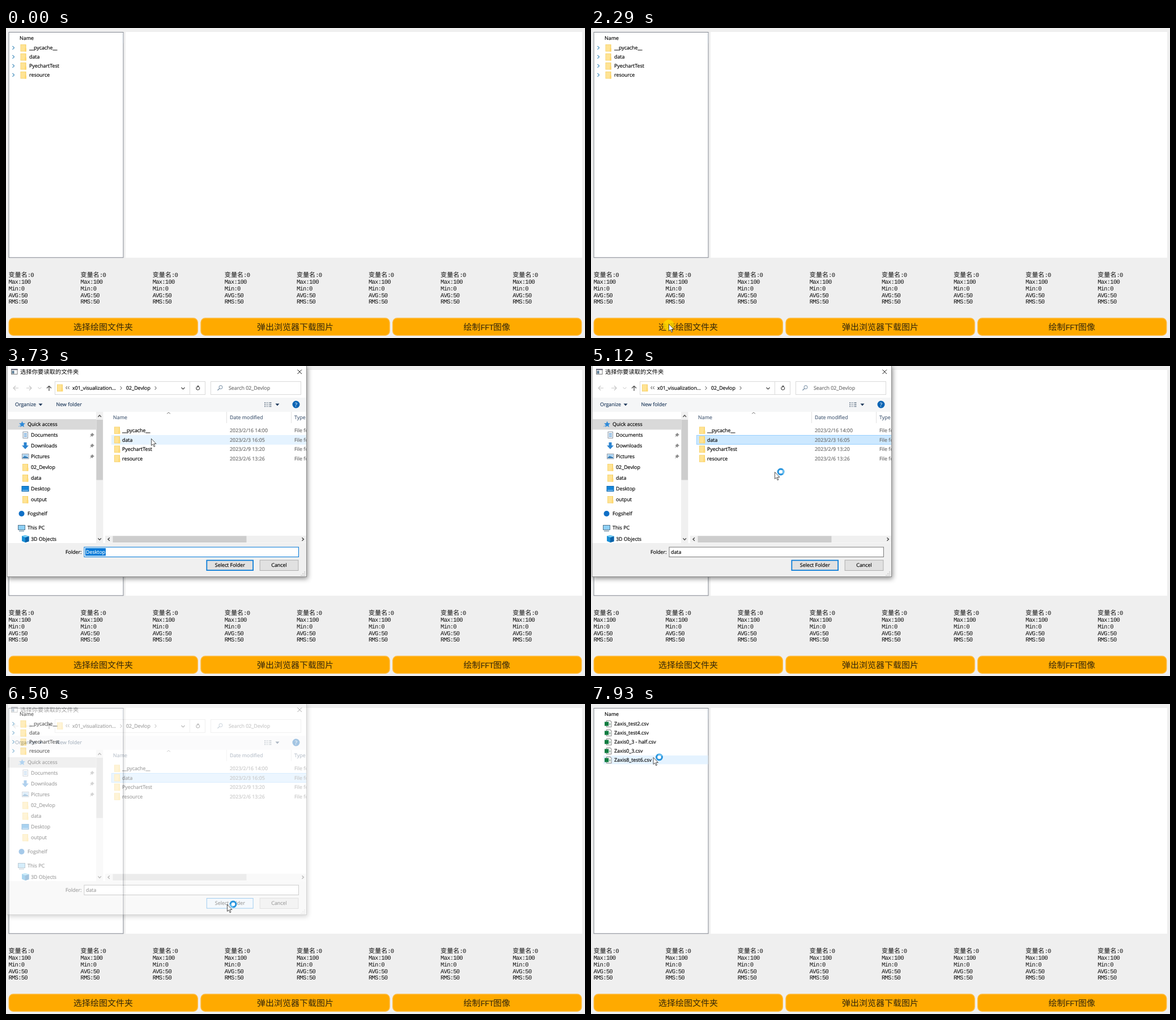
Write an HTML page that moves like this. It is 1022 px wide and 548 px high and loops after 8 s.

```html
<!DOCTYPE html>
<html lang="zh">
<head>
<meta charset="utf-8">
<title>Folder picker</title>
<style>
html, body { margin: 0; width: 100%; height: 100%; overflow: hidden; background: #efefef; }
svg { display: block; width: 1022px; height: 548px; }
text { white-space: pre; text-rendering: geometricPrecision; }
.ui { font: 8.9px "Open Sans", "Noto Sans", sans-serif; stroke-width: .18px; }
.cjk { font-family: "Noto Sans CJK SC", "Noto Sans CJK", "Noto Sans CJK JP", sans-serif; }
.thin { font-weight: 300; }
.mono { font-family: "Liberation Mono", monospace; }
</style>
</head>
<body>
<svg id="stage" viewBox="0 0 1022 548" xmlns="http://www.w3.org/2000/svg"></svg>
<script>
const LOOP = 8000;
const stage = document.getElementById('stage');
const $ = id => document.getElementById(id);

// Markup helpers
const rect = (x, y, w, h, fill, more = '') =>
  `<rect x="${x}" y="${y}" width="${w}" height="${h}" fill="${fill}" ${more}/>`;
const frame = (x, y, w, h, fill, stroke, sw = 1, more = '') =>
  rect(x + sw / 2, y + sw / 2, w - sw, h - sw, fill, `stroke="${stroke}" stroke-width="${sw}" ${more}`);
const line = (d, stroke, sw = 1, more = '') =>
  `<path d="${d}" fill="none" stroke="${stroke}" stroke-width="${sw}" ${more}/>`;
const shape = (d, fill) => `<path d="${d}" fill="${fill}"/>`;
const dot = (x, y, r, fill) => `<circle cx="${x}" cy="${y}" r="${r}" fill="${fill}"/>`;
const group = (id, body, more = '') => `<g id="${id}" ${more}>${body}</g>`;
// y is the middle of the line
const label = (x, y, s, fill = '#000', more = '') =>
  `<text class="ui" x="${x}" y="${y + 3.2}" fill="${fill}" stroke="${fill}" ${more}>${s}</text>`;
const chevron = (x, y, dx, dy, color, sw = 1) => dx
  ? line(`M${x - dx} ${y - 3}L${x + dx} ${y}L${x - dx} ${y + 3}`, color, sw)
  : line(`M${x - 3} ${y - dy}L${x} ${y + dy}L${x + 3} ${y - dy}`, color, sw);
// Latin letters take half the width of a Chinese character
const mixed = (x, y, s, size, color) => {
  const latin = size * 0.96, gap = size / 2 - latin * 0.6;
  const runs = s.match(/[\x20-\x7e]+|[^\x20-\x7e]+/g).map(r => r.charCodeAt(0) < 128
    ? `<tspan class="mono" font-size="${latin}" letter-spacing="${gap}">${r}</tspan>`
    : `<tspan class="cjk thin" font-size="${size}">${r}</tspan>`);
  return `<text x="${x}" y="${y}" fill="${color}">${runs.join('')}</text>`;
};

const folder = (x, y) =>
  rect(x, y - 6, 10, 12.5, '#f5cf63') + rect(x + .7, y - 5.3, 8, 11, '#ffe394') +
  rect(x + 7.6, y + 1, 2.9, 5.6, '#ffd86f');

const csvIcon = y =>
  shape(`M27 ${y - 6}H34L36.5 ${y - 3.5}V${y + 6}H27Z`, '#8a8a8a') +
  shape(`M28 ${y - 5}H33.6L35.5 ${y - 3}V${y + 5}H28Z`, '#fff') +
  rect(32, y - 1, 2.4, 3.5, '#9db8aa') + rect(24, y - 3.5, 7.2, 7.2, '#107c41');

const dirs = ['__pycache__', 'data', 'PyechartTest', 'resource'];
const files = ['Zaxis_test2.csv', 'Zaxis_test4.csv', 'Zaxis0_3 - half.csv', 'Zaxis0_3.csv', 'Zaxis8_test6.csv'];
const rowY = i => 35 + 16 * i;

function mainWindow() {
  let s = rect(0, 0, 1022, 548, '#efefef') + rect(211, 7, 806, 399, '#fff') +
    frame(4.5, 7, 203, 399.3, '#fff', '#828790') +
    line('M206 9V27', '#dfe7ef') + label(24, 18, 'Name') +
    rect(21.5, 91, 185, 15.5, '#e5f3ff', 'id="treeHover"');
  s += group('tree0', dirs.map((d, i) =>
    chevron(13, rowY(i), 1.6, 0, '#4c93bf', 1.1) + folder(25.5, rowY(i)) + label(41, rowY(i), d)).join(''));
  s += group('tree1', files.map((f, i) => csvIcon(rowY(i)) + label(41, rowY(i), f)).join(''));
  for (let c = 0; c < 8; c++)
    ['变量名:0', 'Max:100', 'Min:0', 'AVG:50', 'RMS:50'].forEach((v, r) => {
      s += mixed(4.5 + 127.1 * c, 439.8 + 11.9 * r, v, 11.1, '#111');
    });
  [[4.5, 119, '选择绘图文件夹'], [343.3, 443, '弹出浏览器下载图片'], [682, 807.5, '绘制FFT图像']]
    .forEach(([x, tx, t]) => {
      s += frame(x, 512.3, 334.5, 31.7, '#ffaa00', '#ffb938', 1.5, 'rx="7.5"') + mixed(tx, 534.2, t, 15, '#33270a');
    });
  return s;
}

const pin = y => shape(`M152 ${y - 4}L156 ${y}L154 ${y + .5}L152.5 ${y + 3}L150.8 ${y + 1.4}L148 ${y + 4}L150 ${y + .6}L148.6 ${y - 1}L151 ${y - 2}Z`, '#8c8c8c');

function navPane() {
  let s = rect(3, 94, 156, 18.5, '#d9d9d9') +
    shape('M28.5 97.5L30 101L34 101.5L31 104L32 108L28.5 106L25 108L26 104L23 101.5L27 101Z', '#2f8ad8') +
    line('M22 107L26 105', '#7fb5e4', 1.2);
  [['Quick access', 38, 103], ['Documents', 44, 122], ['Downloads', 44, 141], ['Pictures', 44, 160],
   ['02_Devlop', 44, 179], ['data', 44, 198], ['Desktop', 44, 217], ['output', 44, 236],
   ['Fogshelf', 38, 261], ['This PC', 38, 286], ['3D Objects', 44, 305.5]]
    .forEach(([t, x, y]) => { s += label(x, y, t); });
  s += frame(29.5, 116, 9.5, 12, '#fff', '#8a97a5') + rect(31.5, 119, 5.5, 1.2, '#4a90cf') +
    rect(31.5, 121.5, 5.5, 1.2, '#4a90cf') + rect(31.5, 124, 5.5, 1.2, '#4a90cf');
  s += shape('M31.5 135H36.5V140.5H40L34 147L28 140.5H31.5Z', '#2b83cf');
  s += frame(28, 155, 12.5, 9.5, '#fff', '#8a97a5') + rect(29.5, 156.5, 9.5, 3, '#9fd0f5') +
    shape('M29.5 163V161L33 159L39 161V163Z', '#3b7fb6');
  s += [179, 198, 236].map(y => folder(29, y)).join('') + [122, 141, 160].map(pin).join('');
  s += frame(27.5, 212, 13, 10, '#1686d9', '#0d69b0') + rect(29, 219.5, 10, 1, '#bfe0f8');
  s += dot(27.5, 261, 5, '#0f6fc6');
  s += frame(21, 281, 13, 9, '#8fd0f5', '#52768f') + rect(23, 291, 9, 1.3, '#6b8ba1');
  s += shape('M28 300.5L34 299L40.5 301V310L34 312L28 309.5Z', '#1a8fd6') +
    shape('M34 303L40.5 301V310L34 312Z', '#0b62a8') + shape('M28 300.5L34 299L40.5 301L34 303Z', '#7cd0f4');
  s += rect(159, 81, 12.5, 232, '#f0f0f0') + rect(159.5, 95, 11.5, 106.5, '#cdcdcd') +
    line('M162.5 90L165.2 87L168 90M162.5 304.5L165.2 307.5L168 304.5', '#505050', 1.3);
  return s;
}

function fileList() {
  let s = label(189, 91, 'Name', '#4c607a') + label(395, 91, 'Date modified', '#4c607a') +
    label(509, 91, 'Type', '#4c607a') + line('M389.5 81V101M503.5 81V101', '#e2e2e2') +
    line('M284 84.5L287 82L290 84.5', '#777');
  s += rect(186, 122, 346, 17, '#e5f3ff', 'id="rowHover"') +
    frame(186, 122, 350, 17, '#cce8ff', '#99d1ff', 1, 'id="rowPick"');
  ['2023/2/16 14:00', '2023/2/3 16:05', '2023/2/9 13:20', '2023/2/6 13:26'].forEach((d, i) => {
    const y = 114 + 16.6 * i;
    s += folder(191, y - .5) + label(205, y, dirs[i]) + label(395, y, d, '#6d6d6d') + label(509, y, 'File folder', '#6d6d6d');
  });
  s += rect(175, 300, 356, 12.5, '#f0f0f0') + rect(188.5, 300.5, 236, 11.5, '#cdcdcd') +
    line('M183 303.5L180 306.2L183 309M522.5 303.5L525.5 306.2L522.5 309', '#404040', 1.3);
  return s;
}

function dialog() {
  let s = rect(1.5, -1, 529.5, 374, '#fff', 'filter="url(#shade)"');
  s += frame(9, 5, 11.5, 10, '#fff', '#777') + rect(9, 5, 11.5, 2.2, '#667') + rect(10.5, 8.5, 4, 5, '#5d7d96');
  s += `<text class="cjk" x="25" y="14.2" font-size="10.35">选择你要读取的文件夹</text>`;
  s += line('M514.5 6.5L522 14M522 6.5L514.5 14', '#111');
  // address row
  s += line('M22 39H13M17 35L13 39L17 43M36 39H45M41 35L45 39L41 43', '#c6c6c6', 1.2) +
    chevron(59.5, 39, 0, 1.2, '#c6c6c6') + line('M76 44V35.5M72 39.3L76 35.3L80 39.3', '#4d4d4d', 1.3);
  s += frame(86, 27, 266, 24, '#fff', '#d9d9d9') + line('M324.5 27V51', '#d9d9d9') + folder(90, 38.5) +
    line('M108 36L105.7 38.5L108 41M111.7 36L109.4 38.5L111.7 41', '#333') +
    label(117, 39, 'x01_visualization...') + chevron(203, 39, 1.3, 0, '#444') +
    label(212, 39, '02_Devlop') + chevron(264, 39, 1.3, 0, '#444') + chevron(312.5, 39.5, 0, 1.5, '#444', 1.2);
  s += line('M341 37.2A3 3 0 1 1 338.6 36.2', '#444', 1.1) + shape('M338 34L341.4 36L338 38.2Z', '#444');
  s += frame(361, 27, 160, 24, '#fff', '#d9d9d9') +
    `<circle cx="379" cy="37.5" r="3" fill="none" stroke="#7189a0"/>` + line('M376.8 39.8L373.5 43', '#7189a0', 1.2) +
    label(393, 39, 'Search 02_Devlop', '#6d6d6d');
  // toolbar
  s += rect(2, 56, 528.5, 25, '#f5f6f7') + label(16, 68, 'Organize', '#1e395b') +
    shape('M57.5 66.5H64.5L61 70.5Z', '#1e395b') + label(88.5, 68, 'New folder', '#1e395b');
  for (let r = 0; r < 3; r++)
    s += rect(456, 64 + 3.2 * r, 2.2, 2, '#8a97a5') + rect(459.2, 64 + 3.2 * r, 4, 2, '#b6bfc8') +
      rect(464.5, 64 + 3.2 * r, 4, 2, '#8a97a5');
  s += shape('M475.5 66.5H482.5L479 70.5Z', '#1e395b') + dot(512, 68, 6.5, '#0a64b4') +
    `<text class="ui" x="512" y="71.6" fill="#fff" font-weight="700" style="font-size:10px" text-anchor="middle">?</text>`;
  s += navPane() + group('list', fileList(), 'clip-path="url(#pane)"');
  // footer
  s += rect(2, 313, 528.5, 59.5, '#f0f0f0') + label(105, 329, 'Folder:') +
    frame(137.5, 319.7, 379.5, 18.3, '#fff', '#0078d7', 1, 'id="field"') +
    group('typed0', rect(140, 322, 36, 13.5, '#0078d7') + label(141, 328.5, 'Desktop', '#fff')) +
    group('typed1', label(141, 328.5, 'data'));
  s += frame(353.5, 342.7, 83.5, 19.3, '#e1e1e1', '#0078d7', 1.7, 'id="ok"') + label(395.3, 352.2, 'Select Folder', '#000', 'text-anchor="middle"') +
    frame(447.7, 342.7, 68.7, 19.3, '#e1e1e1', '#adadad') + label(482, 352.2, 'Cancel', '#000', 'text-anchor="middle"');
  for (const [x, y] of [[527, 365], [524, 368], [527, 368], [521, 371], [524, 371], [527, 371]])
    s += rect(x - .5, y - 1.5, 1.5, 1.5, '#bdbdbd');
  return s + frame(1.5, -1, 529.5, 374, 'none', '#8b8b8b');
}

const arrow = 'M.5 .5V12.6L3.2 10.1L5.2 14.8L7 14L5.1 9.5H9Z';
stage.innerHTML =
  `<defs><filter id="shade" x="-10%" y="-10%" width="120%" height="120%">
    <feDropShadow dx="1.5" dy="3" stdDeviation="4.5" flood-color="#000" flood-opacity=".45"/></filter>
    <clipPath id="pane"><rect x="172" y="81" width="358.5" height="232"/></clipPath></defs>` +
  mainWindow() + group('dialog', dialog()) +
  group('pointer',
    `<circle id="press" cx="0" cy="2.5" r="10" fill="#ffd800" fill-opacity=".8"/>` +
    `<path d="${arrow}" fill="#fff" stroke="#222" stroke-width=".8"/>` +
    group('busy', dot(11, 0, 6.6, '#fff') +
      `<circle cx="11" cy="0" r="4.9" fill="none" stroke="#2a95dd" stroke-width="3.2"/>` +
      `<path id="arc" d="M11 -4.9A4.9 4.9 0 0 1 15.9 0" fill="none" stroke="#6cc3f3" stroke-width="2.4"/>`));

// Pointer moves: start, end, from, to
const moves = [
  [450, 520, 116, 508, 17, 498],
  [990, 1200, 0, 470, 76, 416],
  [1530, 2020, 76, 416, 137, 523],
  [3110, 3700, 137, 523, 256, 128],
  [4880, 5120, 256, 128, 324, 187],
  [5200, 5600, 324, 187, 390, 354],
  [6990, 7240, 390, 354, 234, 199],
  [7290, 7800, 234, 199, 109.5, 94]
];
const clicks = [2290, 4420, 6230];
const clamp = v => Math.max(0, Math.min(1, v));
const ease = v => v * v * (3 - 2 * v);
const show = (id, on) => { $(id).style.display = on ? '' : 'none'; };
const set = (id, attrs) => { for (const k in attrs) $(id).setAttribute(k, attrs[k]); };

function pointerAt(t) {
  const m = moves.filter(m => t >= m[0]).pop() || moves[0];
  const k = ease(clamp((t - m[0]) / (m[1] - m[0])));
  return [m[2] + (m[4] - m[2]) * k, m[3] + (m[5] - m[3]) * k];
}

function draw(t) {
  const [x, y] = pointerAt(t);
  const open = clamp((t - 2570) / 150) * clamp((6560 - t) / 160);
  const picked = t >= 4420, typed = t >= 4490, loaded = t >= 6560;
  const overOk = open > 0 && x > 354 && x < 437 && y > 343 && y < 362;

  set('pointer', { transform: `translate(${x} ${y})` });
  show('pointer', (t >= 450 && t < 590) || t >= 990);
  show('press', clicks.some(c => t >= c && t < c + 220));
  show('busy', t >= 4700);
  set('arc', { transform: `rotate(${t * 0.36} 11 0)` });

  set('dialog', { opacity: open });
  show('dialog', open > 0);
  show('rowPick', picked);
  show('rowHover', !picked && x > 186 && y > 122 && y < 139);
  show('typed0', !typed);
  show('typed1', typed);
  set('field', { stroke: picked ? '#7a7a7a' : '#0078d7' });
  set('ok', { fill: overOk ? '#e5f1fb' : '#e1e1e1', 'stroke-width': overOk ? 1 : 1.7 });

  show('tree0', !loaded);
  show('tree1', loaded);
  show('treeHover', loaded && x < 206 && y > 91 && y < 107);
}

function tick() {
  draw(performance.now() % LOOP);
  requestAnimationFrame(tick);
}
tick();
</script>
</body>
</html>
```
